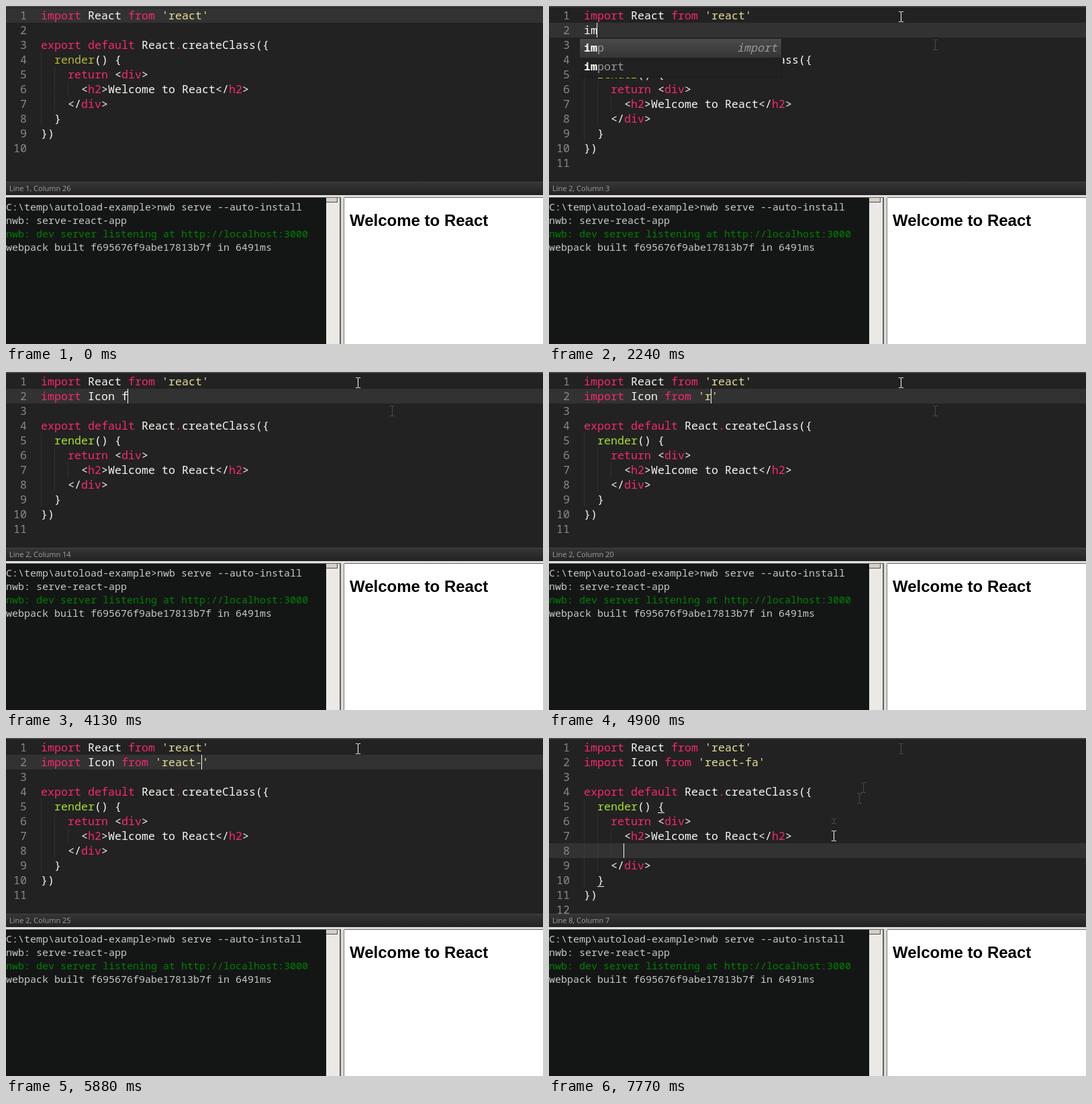
Animation of 800x504 px, one loop 8000 ms. Source, as an HTML page with a canvas:

```html
<!DOCTYPE html>
<html lang="en">
<head>
<meta charset="utf-8">
<title>Editor and dev server</title>
<style>
  html, body { margin: 0; width: 100%; height: 100%; overflow: hidden; background: #222; }
  canvas { display: block; width: 800px; height: 504px; }
</style>
</head>
<body>
<canvas id="stage" width="800" height="504"></canvas>
<script>
const ctx = document.getElementById('stage').getContext('2d');
const LOOP = 8000, TICK = 70, BLINK = 350;
const NEW_LINE = 1610, CLICK = 7210, SPLIT_LINE = 7770;
const MONO = '"Noto Sans Mono", "DejaVu Sans Mono", monospace';
const CODE = `16.667px ${MONO}`;
const LEFT = 51, CHAR = 10, TOP = 3, ROW = 22;
const PINK = '#f92672', WHITE = '#f8f8f2', STRING = '#e6db94', FAINT = '#4c4c4c';

const code = `import React from 'react'

export default React.createClass({
  render() {
    return <div>
      <h2>Welcome to React</h2>
    </div>
  }
})
`.split('\n');

// Bursts of typing, one character per tick
const bursts = [
  [2030, 'im'], [2380, 'por'], [2660, 't'], [2800, ' '], [3080, 'I'], [3500, 'con'],
  [3920, ' '], [4130, 'from '], [4620, "'"], [4900, 'rea'], [5390, 'ct'], [5880, '-fa']
];
const completions = ['imp', 'import', 'from', 'for', 'React', 'render', 'return'];

// Pointer glides: start, end, x, y
const glides = [[350, 350, 575, 58], [420, 420, 524, 79], [630, 1050, 524, 16],
  [6370, 6720, 424, 121], [6930, 7070, 424, 146]];
// Marks the pointer leaves behind: x, y, half height, since
const marks = [[524, 16, 8, 6370], [468, 74, 8, 6580], [462, 90, 8, 6650], [424, 124, 4, 7000]];

function rect(x, y, w, h, color) {
  ctx.fillStyle = color;
  ctx.fillRect(x, y, w, h);
}

function text(str, x, y, color, font = CODE, align = 'left') {
  ctx.font = font;
  ctx.textAlign = align;
  ctx.fillStyle = color;
  ctx.fillText(str, x, y);
}

function vertical(y0, y1, top, bottom) {
  const g = ctx.createLinearGradient(0, y0, 0, y1);
  g.addColorStop(0, top);
  g.addColorStop(1, bottom);
  return g;
}

const rowY = row => TOP + row * ROW;
const baseline = row => rowY(row) + 17;
const caretX = col => LEFT + col * CHAR;
const textX = col => caretX(col) + 1;

const typedAt = t => bursts.map(([start, s]) =>
  s.slice(0, Math.max(0, Math.floor((t - start) / TICK) + 1))).join('');

// Caret place, buffer and time of the last input
function editorState(t) {
  const lines = code.slice();
  const state = { lines, row: 0, col: code[0].length, last: 1110, typed: '' };
  if (t >= NEW_LINE) {
    const typed = typedAt(t);
    const [start, s] = bursts.findLast(b => b[0] <= t) || [NEW_LINE, ''];
    const last = Math.min(t, start + Math.max(0, s.length - 1) * TICK);
    lines.splice(1, 0, typed + (typed.includes("'") ? "'" : ''));
    Object.assign(state, { row: 1, col: typed.length, last, typed });
  }
  if (t >= CLICK) Object.assign(state, { row: 6, col: lines[6].length, last: CLICK });
  if (t >= SPLIT_LINE) {
    lines.splice(7, 0, ' '.repeat(6));
    Object.assign(state, { row: 7, col: 6, last: SPLIT_LINE });
  }
  return state;
}

function drawCode(line, row, t) {
  const indent = line.match(/^ */)[0].length;
  for (let col = 0; col < indent; col += 2)
    for (let y = 0; y < ROW; y += 2) rect(textX(col), rowY(row) + y, 1, 1, '#404040');

  const tokens = /('[^']*'?)|(\b(?:import|from|export|default|return)\b|\.|\b(?:div|h2)(?=>))|(\brender\b)|[A-Za-z0-9]+|[^\sA-Za-z0-9'.]/g;
  for (const m of line.matchAll(tokens)) {
    const method = t < NEW_LINE ? '#b3b83a' : '#a6e22e';
    const color = m[1] ? STRING : m[2] ? PINK : m[3] ? method : WHITE;
    text(m[0], textX(m.index), baseline(row), color);
  }
}

function ibeam(x, y, color, half = 8) {
  rect(x, y - half + 1, 1, 2 * half - 2, color);
  for (const end of [y - half, y + half - 1]) {
    rect(x - 3, end, 3, 1, color);
    rect(x + 1, end, 3, 1, color);
  }
}

function drawPointer(t) {
  if (t >= 420 && t < 5040) ibeam(575, 58, FAINT);
  for (const [x, y, half, since] of marks) if (t >= since) ibeam(x, y, FAINT, half);
  if (t < glides[0][0]) return;
  const now = t - t % TICK;
  let x = 0, y = 0;
  for (const [start, end, toX, toY] of glides) {
    if (now < start) break;
    const k = Math.min(1, (now - start + TICK) / (end - start + TICK));
    x += (toX - x) * k;
    y += (toY - y) * k;
  }
  ibeam(Math.round(x), Math.round(y), '#fff');
}

function drawPopup(t, typed) {
  const word = typed.match(/[a-z]*$/i)[0];
  const start = typed.length - word.length;
  if (!word || typedAt(t - TICK).length <= start) return;
  const lower = word.toLowerCase();
  const items = completions.filter(s => s.toLowerCase().startsWith(lower));
  if (!items.length || items.at(-1).toLowerCase() === lower) return;

  const x = caretX(start) - 5, y = 49, w = 300, h = 28;
  rect(x, y, w + 2, items.length * h + 2, '#1e1e1e');
  items.forEach((name, i) => {
    const top = y + i * h, base = top + 19;
    rect(x, top, w, h, i ? '#212121' : vertical(top, top + h, '#4b4b4b', '#353535'));
    text(name.slice(0, word.length), x + 6, base, '#fff', `bold ${CODE}`);
    text(name.slice(word.length), x + 6 + word.length * CHAR, base, '#999');
    if (name === 'imp') text('import', x + w - 6, base, '#999', `italic ${CODE}`, 'right');
  });
}

function drawEditor(t) {
  const { lines, row, col, last, typed } = editorState(t);
  ctx.save();
  ctx.beginPath();
  ctx.rect(0, 0, 800, 262);
  ctx.clip();
  rect(0, 0, 800, 262, '#222');
  rect(0, 0, 800, 2, '#434343');
  rect(0, 2, 800, 1, '#1c1c1c');
  rect(0, rowY(row), 800, ROW, '#313231');
  lines.forEach((line, i) => {
    text(i + 1, 31, baseline(i), '#8c8689', CODE, 'right');
    drawCode(line, i, t);
  });
  if (t >= CLICK) {
    for (const i of [4, lines.indexOf('  }')])
      rect(textX(lines[i].length - 1), baseline(i) + 3, CHAR, 1, WHITE);
  }
  const idle = t - last;
  if (idle >= 0 && idle % (2 * BLINK) < BLINK) rect(caretX(col), rowY(row), 1, ROW, WHITE);
  if (t < CLICK) drawPopup(t, typed);
  drawPointer(t);
  ctx.restore();

  rect(0, 262, 800, 20, vertical(262, 282, '#363636', '#232323'));
  rect(0, 262, 800, 1, '#414141');
  text(`Line ${row + 1}, Column ${col + 1}`, 5, 276, '#a0a0a0', '11px "Open Sans", "Noto Sans", sans-serif');
}

function drawConsole() {
  rect(0, 282, 800, 3, '#e4e2de');
  rect(0, 285, 800, 1, '#606060');
  rect(0, 286, 477, 218, '#141616');
  [
    'C:\\temp\\autoload-example>nwb serve --auto-install',
    'nwb: serve-react-app',
    'nwb: dev server listening at http://localhost:3000',
    'webpack built f695676f9abe17813b7f in 6491ms'
  ].forEach((s, i) => text(s, 0, 305 + i * 20, i === 2 ? '#008000' : '#c8c8c8', `15px ${MONO}`));

  // Scroll bar with its thumb
  rect(477, 286, 20, 218, '#ebe9e5');
  rect(477, 286, 17, 7, '#505050');
  rect(477, 286, 16, 6, '#d4d0c8');
}

function drawBrowser() {
  rect(497, 285, 7, 219, '#dedbd5');
  rect(497, 285, 2, 219, '#606060');
  rect(503, 286, 1, 218, '#777');
  rect(504, 286, 296, 218, '#fff');
  text('Welcome to React', 512, 328, '#000', 'bold 24px "Liberation Sans", Arial, sans-serif');
}

function frame() {
  drawEditor(performance.now() % LOOP);
  drawConsole();
  drawBrowser();
  requestAnimationFrame(frame);
}
frame();
</script>
</body>
</html>
```
